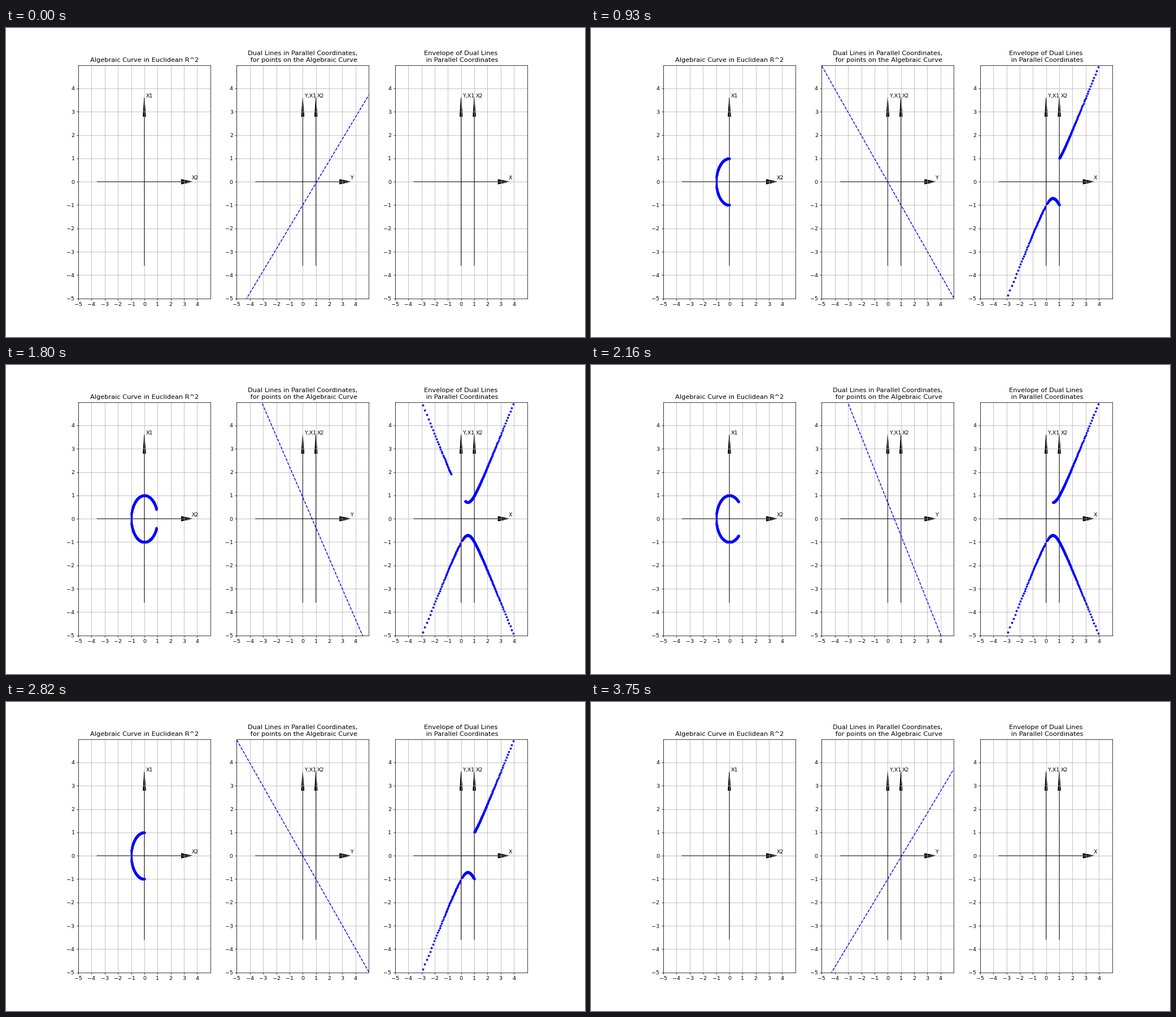
Animation of 1025x547 px, one loop 3.78 s. Source, as a matplotlib script:

```python
import matplotlib.pyplot as plt
import numpy as np
from matplotlib.animation import FuncAnimation

WIDTH, HEIGHT = 1025, 547
DPI = WIDTH / 15
LIMIT = 5
AXIS_REACH = 3.6
HEAD = 0.8
POINTS_PER_STEP = 8
INTERVAL = 30

plt.rcParams.update({"font.family": "DejaVu Sans", "font.size": 10})

# Samples of the unit circle; x is evenly spaced over the visible range.
grid = np.linspace(-LIMIT, LIMIT, 2500)
x1 = grid[np.abs(grid) <= 1]
x2 = np.sqrt(1 - x1**2)


def dual_of_tangent(a, b):
    """Parallel-coordinates point of the circle's tangent at (a, b)."""
    return b / (a + b), 1 / (a + b)


def draw_axis(ax, origin, direction):
    """Shaft above the grid, arrowhead below it."""
    origin, direction = np.array(origin), np.array(direction)
    tail = origin - AXIS_REACH * direction
    neck = origin + (AXIS_REACH - HEAD) * direction
    ax.plot(*zip(tail, neck), "k", lw=1, snap=False, solid_capstyle="butt")
    ax.arrow(*neck, *(HEAD * direction), head_width=0.2, head_length=HEAD,
             lw=1, fc="k", ec="k", length_includes_head=True)


def setup_panel(ax, title, horizontal, verticals):
    ax.set_title(title, fontsize=12)
    draw_axis(ax, (0, 0), (1, 0))
    ax.text(AXIS_REACH, 0.1, horizontal)
    for x, label in enumerate(verticals):
        draw_axis(ax, (x, 0), (0, 1))
        ax.text(x + 0.1, AXIS_REACH, label)
    ax.set_xticks(np.arange(-LIMIT, LIMIT))
    ax.set_yticks(np.arange(-LIMIT, LIMIT))
    ax.set_xlim(-LIMIT, LIMIT)
    ax.set_ylim(-LIMIT, LIMIT)
    ax.grid(True)


# The tiny margin guards against losing a pixel to rounding.
fig, (curve_ax, lines_ax, envelope_ax) = plt.subplots(
    1, 3, figsize=((WIDTH + 1e-6) / DPI, (HEIGHT + 1e-6) / DPI), dpi=DPI)
fig.subplots_adjust(left=0.125, right=0.9, bottom=0.125, top=0.88, wspace=0.2)

setup_panel(curve_ax, "Algebraic Curve in Euclidean R^2", "X2", ["X1"])
setup_panel(lines_ax, "Dual Lines in Parallel Coordinates,\n"
            " for points on the Algebraic Curve", "Y", ["Y,X1", "X2"])
setup_panel(envelope_ax, "Envelope of Dual Lines\n in Parallel Coordinates",
            "X", ["Y,X1", "X2"])

curve_dots, = curve_ax.plot([], [], "b.")
dual_line, = lines_ax.plot([], [], "b--")
envelope_dots, = envelope_ax.plot([], [], "b.")

forward = list(range(0, len(x1), POINTS_PER_STEP))
sweep = forward + forward[::-1]


def update(frame):
    n = sweep[frame]
    a = np.concatenate([x1[:n], x1[:n]])
    b = np.concatenate([x2[:n], -x2[:n]])
    curve_dots.set_data(a, b)
    envelope_dots.set_data(*dual_of_tangent(a, b))

    # The dual line meets the axes x=0 and x=1 at the point's coordinates.
    ends = np.array([-LIMIT, LIMIT])
    dual_line.set_data(ends, x1[n] + ends * (-x2[n] - x1[n]))
    return curve_dots, dual_line, envelope_dots


anim = FuncAnimation(fig, update, frames=len(sweep), interval=INTERVAL,
                     init_func=lambda: update(0), repeat=True)
plt.show()
```
